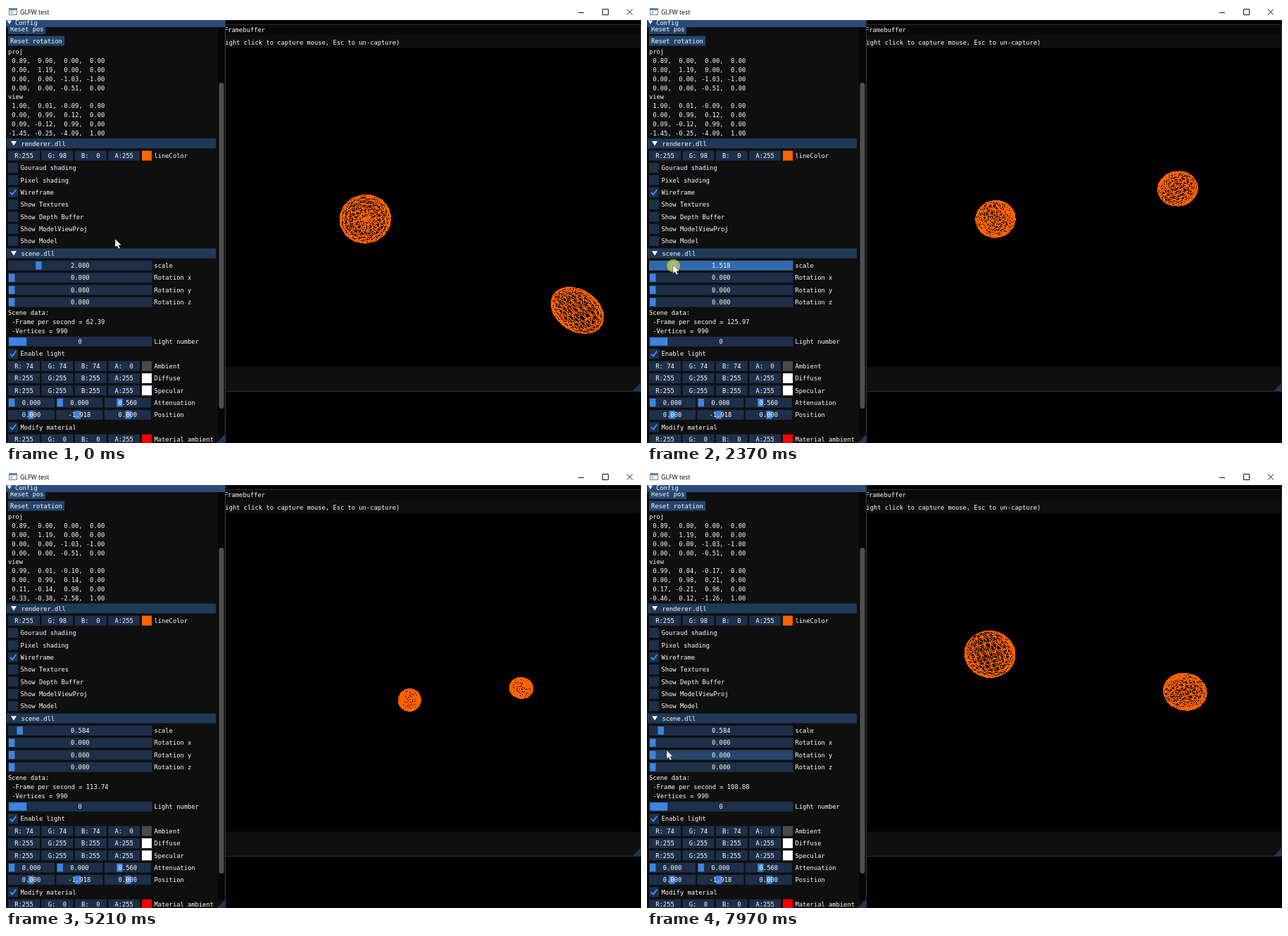
An HTML page that plays this animation: 902 by 621 pixels, repeating every 8 s.

```html
<!DOCTYPE html>
<html lang="en">
<head>
<meta charset="utf-8">
<title>GLFW test</title>
<style>
  html, body { margin: 0; width: 100%; height: 100%; overflow: hidden; background: #000; }
  svg { display: block; width: 902px; height: 621px; }
  text { font: 8.77px "DejaVu Sans Mono", monospace; fill: #fff; white-space: pre; }
  text.caption { font: 8.8px "Open Sans", sans-serif; fill: #000; }
  .wire { fill: none; stroke: #ff6200; stroke-width: 1; shape-rendering: crispEdges; }
</style>
</head>
<body>
<svg id="stage" viewBox="0 0 902 621"></svg>
<script>
const LOOP = 8000, STEP = 76.77, FOCAL = 269, CENTER = [598, 286], RADIUS = 0.264;
const FRAME = '#1d2f49', HOVER = '#24456d', ACTIVE = '#316aac', GRAB = '#3d85e0', HEADER = '#1f3958';
const stage = document.getElementById('stage');

function add(tag, attrs, content) {
  const node = document.createElementNS('http://www.w3.org/2000/svg', tag);
  for (const key in attrs) node.setAttribute(key, attrs[key]);
  if (content !== undefined) node.textContent = content;
  return stage.appendChild(node);
}
const rect = (x, y, width, height, fill, rx = 0) => add('rect', { x, y, width, height, fill, rx });
const path = (d, fill, stroke = 'none') => add('path', { d, fill, stroke });
const label = (x, cy, s) => add('text', { x, y: cy + 3.2 }, s);
const centered = (x, cy, s) => add('text', { x, y: cy + 3.2, 'text-anchor': 'middle' }, s);

// Framebuffer window
rect(311, 26, 591, 522, '#0f0f0f');
rect(311, 26, 591, 15, '#0a0a0a');
path('M311 26.5H901.5V547.5H311', 'none', '#2e2e37');
rect(311, 60, 589, 452.5, '#000');
path('M901 536V547H890Z', '#1c3657');
label(310, 34, 'Framebuffer');
label(300.8, 52, '(Right click to capture mouse, Esc to un-capture)');
const spheres = [add('path', { class: 'wire' }), add('path', { class: 'wire' })];

// Config panel
const hoverables = [];
const hoverable = (node, x, y, w, h, base, over) => (hoverables.push({ node, x, y, w, h, base, over }), node);

function header(cy, title) {
  hoverable(rect(1, cy - 7, 297, 14, HEADER), 1, cy - 7, 297, 14, HEADER, '#387bcb');
  path(`M7 ${cy - 3.2}H15L11 ${cy + 3.3}Z`, '#fff');
  label(21.5, cy, title);
}
function checkbox(cy, title, on) {
  rect(3, cy - 7, 14, 14, FRAME);
  if (on) add('path', { d: `M5.8 ${cy}L8.8 ${cy + 3.3}L14.3 ${cy - 3.7}`, fill: 'none', stroke: '#4296fa', 'stroke-width': 1.8 });
  label(20.5, cy, title);
}
function colorRow(cy, values, swatch, title) {
  [...'RGBA'].forEach((c, i) => {
    rect(3 + 47.4 * i, cy - 7, 45, 14, FRAME);
    centered(25.5 + 47.4 * i, cy, c + ':' + String(values[i]).padStart(3));
  });
  rect(193, cy - 7, 14, 14, swatch);
  label(210.5, cy, title);
}
function slider(cy, value, grabX, title, x = 3, w = 204.5, grabW = 8.4) {
  const frame = hoverable(rect(x, cy - 7, w, 14, FRAME), x, cy - 7, w, 14, FRAME, HOVER);
  const grab = rect(grabX, cy - 5.7, grabW, 11.4, GRAB);
  const text = centered(x + w / 2, cy, value);
  if (title) label(210.5, cy, title);
  return { frame, grab, text };
}
function sliderRow(cy, values, grabs, title) {
  values.forEach((v, i) => slider(cy, v, grabs[i], '', 3 + 68.4 * i, 66));
  label(210.5, cy, title);
}

rect(0, 20, 311, 601, '#0f0f0f');
rect(3, 26, 53, 14, HOVER);
label(6, 33, 'Reset pos');
rect(3, 42.5, 80, 14, HOVER);
label(6, 49.5, 'Reset rotation');
rect(0, 20, 311, 10, '#294a7a');
label(13, 23.5, 'Config');
path('M1.5 20.5H8L4.8 26Z', '#fff');

const line = (top, i) => top + 12.83 * i;
label(3, 65, 'proj');
['0.89,  0.00,  0.00,  0.00', '0.00,  1.19,  0.00,  0.00', '0.00,  0.00, -1.03, -1.00', '0.00,  0.00, -0.51,  0.00']
  .forEach((s, i) => label(3, line(78, i), ' ' + s));
label(3, 129.2, 'view');
const viewRows = [0, 1, 2, 3].map(i => label(3, line(142, i), ''));

const row = i => 195.3 + 17.35 * i;
header(row(0), 'renderer.dll');
colorRow(row(1), [255, 98, 0, 255], '#ff6200', 'lineColor');
['Gouraud shading', 'Pixel shading', 'Wireframe', 'Show Textures', 'Show Depth Buffer', 'Show ModelViewProj', 'Show Model']
  .forEach((s, i) => checkbox(row(2 + i), s, i === 2));
header(row(9), 'scene.dll');
const scale = slider(row(10), '', 42, 'scale');
[...'xyz'].forEach((axis, i) => slider(row(11 + i), '0.000', 4, 'Rotation ' + axis));
label(3, 436, 'Scene data:');
const fpsText = label(3, 449, '');
label(3, 461.8, ' -Vertices = 990');

const low = i => 476.9 + 17.35 * i;
slider(low(0), '0', 4.2, 'Light number', 3, 204.5, 25);
checkbox(low(1), 'Enable light', true);
colorRow(low(2), [74, 74, 74, 0], '#4a4a4a', 'Ambient');
colorRow(low(3), [255, 255, 255, 255], '#fff', 'Diffuse');
colorRow(low(4), [255, 255, 255, 255], '#fff', 'Specular');
sliderRow(low(5), ['0.000', '0.000', '0.560'], [4, 72.6, 157.2], 'Attenuation');
sliderRow(low(6), ['0.000', '-1.918', '0.000'], [31.3, 97.6, 169.3], 'Position');
checkbox(low(7), 'Modify material', true);
colorRow(low(8), [255, 0, 0, 255], '#f00', 'Material ambient');

rect(301.5, 30, 9, 580, '#060606');
hoverable(rect(302.5, 109, 7, 463, '#4f4f4f', 3.5), 302, 109, 8, 463, '#4f4f4f', '#696969');
path('M311 609V621H299Z', '#1c3657');
path('M311.5 20V621', 'none', '#37373f');

// Title bar
rect(0, 0, 902, 20, '#fff');
rect(4.5, 3.5, 11, 9, '#fff').setAttribute('stroke', '#6a7f96');
rect(5, 4, 10, 2.2, '#4a86c8');
rect(6.5, 7.5, 3, 3.5, '#9fc2a8');
add('text', { class: 'caption', x: 20, y: 11.8 }, 'GLFW test');
path('M813 9.5H821M847.5 4.5H855.5V12.5H847.5ZM882 4.5L890 12.5M890 4.5L882 12.5', 'none', '#111');

const press = add('circle', { r: 9.5, fill: '#d8d83c', opacity: 0.65 });
const cursor = path('M0 0V12L2.8 9.6L4.8 14L6.9 13.1L5.1 8.8H8.8Z', '#fff', '#111');
cursor.setAttribute('stroke-width', 0.4);

// Tracks are keyed by step: [step, ...values]
function track(keys, smooth) {
  const slope = (i, c) => {
    const a = keys[Math.max(i - 1, 0)], b = keys[Math.min(i + 1, keys.length - 1)];
    return (b[c] - a[c]) / (b[0] - a[0]);
  };
  return n => {
    if (n <= keys[0][0]) return keys[0].slice(1);
    const j = keys.findIndex(k => k[0] >= n);
    if (j < 0) return keys[keys.length - 1].slice(1);
    const a = keys[j - 1], b = keys[j], span = b[0] - a[0], u = (n - a[0]) / span;
    return a.slice(1).map((v, i) => {
      const c = i + 1, lin = v + (b[c] - v) * u;
      if (!smooth) return lin;
      const h = u * u * (3 - 2 * u);
      return v + (b[c] - v) * h + span * u * (1 - u) * ((1 - u) * slope(j - 1, c) - u * slope(j, c));
    });
  };
}
const scaleAt = track([[23, 2], [31, 1.518], [33, 1.35], [37, 1], [42, 0.7], [44, 0.584]]);
const fpsAt = track([[0, 62.39], [18, 67.93], [31, 125.97], [42, 119.99], [68, 113.74], [85, 101.4], [104, 108.08]]);
const moveAt = track([[55, -1.45, -0.25, -4.09], [68, -0.33, -0.38, -2.58], [76, -0.46, 0.12, -1.25],
  [86, -0.46, 0.12, -1.25], [88, -0.46, 0.12, -1.26]]);
const lookAt = track([[66, 0.09, 0.12], [68, 0.1055, 0.14], [78, 0.17, 0.14], [86, 0.17, 0.14], [88, 0.17, 0.21]]);
const moonX = track([[0, 2.64], [9, 2.52], [18, 2.54], [31, 2.62], [42, 2.93], [45, 3], [56, 3.03], [68, 2.91], [85, 2.6], [104, 2.47]], true);
const moonY = track([[0, -1.22], [9, -1.57], [18, -1.15], [31, 0.42], [42, 1.7], [49, 1.9], [58, 1.25], [68, 0.22], [85, -1.56], [91, -1.65], [104, -0.58]], true);
const cursorAt = track([[0, 155, 331], [4, 155, 331], [11, 103, 343], [18, 53, 370], [23, 46, 368], [31, 37, 368], [42, 22, 368], [44, 20, 368],
  [45, 20, 368], [50, 290, 308], [52, 308, 304], [54, 420, 290], [89, 560, 330], [93, 330, 428], [95, 306, 436], [99, 62, 440], [104, 28, 397]]);

// Unit sphere: stacks by slices, each quad split by a diagonal
const STACKS = 12, SLICES = 15, edges = [];
const point = (i, j) => {
  const a = i * Math.PI / STACKS, b = j * 2 * Math.PI / SLICES;
  return [Math.sin(a) * Math.cos(b), Math.sin(a) * Math.sin(b), Math.cos(a)];
};
for (let i = 1; i <= STACKS; i++) for (let j = 0; j < SLICES; j++) {
  edges.push([point(i - 1, j), point(i, j)]);
  if (i < STACKS) edges.push([point(i, j), point(i, j + 1)]);
  if (i > 1 && i < STACKS) edges.push([point(i - 1, j), point(i, j + 1)]);
}

function wire(cx, cy, size, tilt, turn, view) {
  const ct = Math.cos(tilt), st = Math.sin(tilt), cr = Math.cos(turn), sr = Math.sin(turn);
  const project = ([x, y, z]) => {
    const y1 = y * ct + z * st, z1 = z * ct - y * st;
    const p = [cx + RADIUS * (x * cr + z1 * sr), cy + RADIUS * y1, RADIUS * (z1 * cr - x * sr)];
    const e = [0, 1, 2].map(k => view[3][k] + size * (p[0] * view[0][k] + p[1] * view[1][k] + p[2] * view[2][k]));
    return (CENTER[0] - FOCAL * e[0] / e[2]).toFixed(1) + ' ' + (CENTER[1] + FOCAL * e[1] / e[2]).toFixed(1);
  };
  return edges.map(([a, b]) => 'M' + project(a) + 'L' + project(b)).join('');
}

function viewMatrix(n) {
  const [sy, sp] = lookAt(n), cy = Math.sqrt(1 - sy * sy), cp = Math.sqrt(1 - sp * sp);
  return [[cy, sy * sp, -sy * cp, 0], [0, cp, sp, 0], [sy, -sp * cy, cp * cy, 0], [...moveAt(n), 1]];
}

function render(n) {
  const seconds = n * STEP / 1000, view = viewMatrix(n), [size] = scaleAt(n);
  view.forEach((r, i) => viewRows[i].textContent = r.map(v => v.toFixed(2).padStart(5)).join(', '));
  fpsText.textContent = ' -Frame per second = ' + fpsAt(n)[0].toFixed(2);

  const sway = 0.04 - 0.125 * Math.cos(seconds - 1.8);
  spheres[0].setAttribute('d', wire(sway, 0, size, 0.2, 0.3 + seconds, view));
  spheres[1].setAttribute('d', wire(moonX(n)[0], moonY(n)[0], size, 0.6, 1.3 + seconds, view));

  const [mx, my] = cursorAt(n), shown = n <= 54 || n >= 89, pressed = n >= 23 && n < 45;
  for (const h of hoverables) {
    const over = shown && !pressed && mx >= h.x && mx <= h.x + h.w && my >= h.y && my <= h.y + h.h;
    h.node.setAttribute('fill', over ? h.over : h.base);
  }
  if (pressed) scale.frame.setAttribute('fill', ACTIVE);
  scale.grab.setAttribute('fill', pressed ? '#4296fa' : GRAB);
  scale.grab.setAttribute('x', 4.4 + 18.95 * size);
  scale.text.textContent = size.toFixed(3);

  press.setAttribute('visibility', pressed ? 'visible' : 'hidden');
  press.setAttribute('cx', mx + 0.5);
  press.setAttribute('cy', my + 1.3);
  cursor.setAttribute('visibility', shown ? 'visible' : 'hidden');
  cursor.setAttribute('transform', `translate(${mx} ${my})`);
}

const start = performance.now();
let last = -1;
function tick() {
  const n = Math.floor(((performance.now() - start) % LOOP + 26) / STEP);
  if (n !== last) render(last = n);
  requestAnimationFrame(tick);
}
tick();
</script>
</body>
</html>
```
